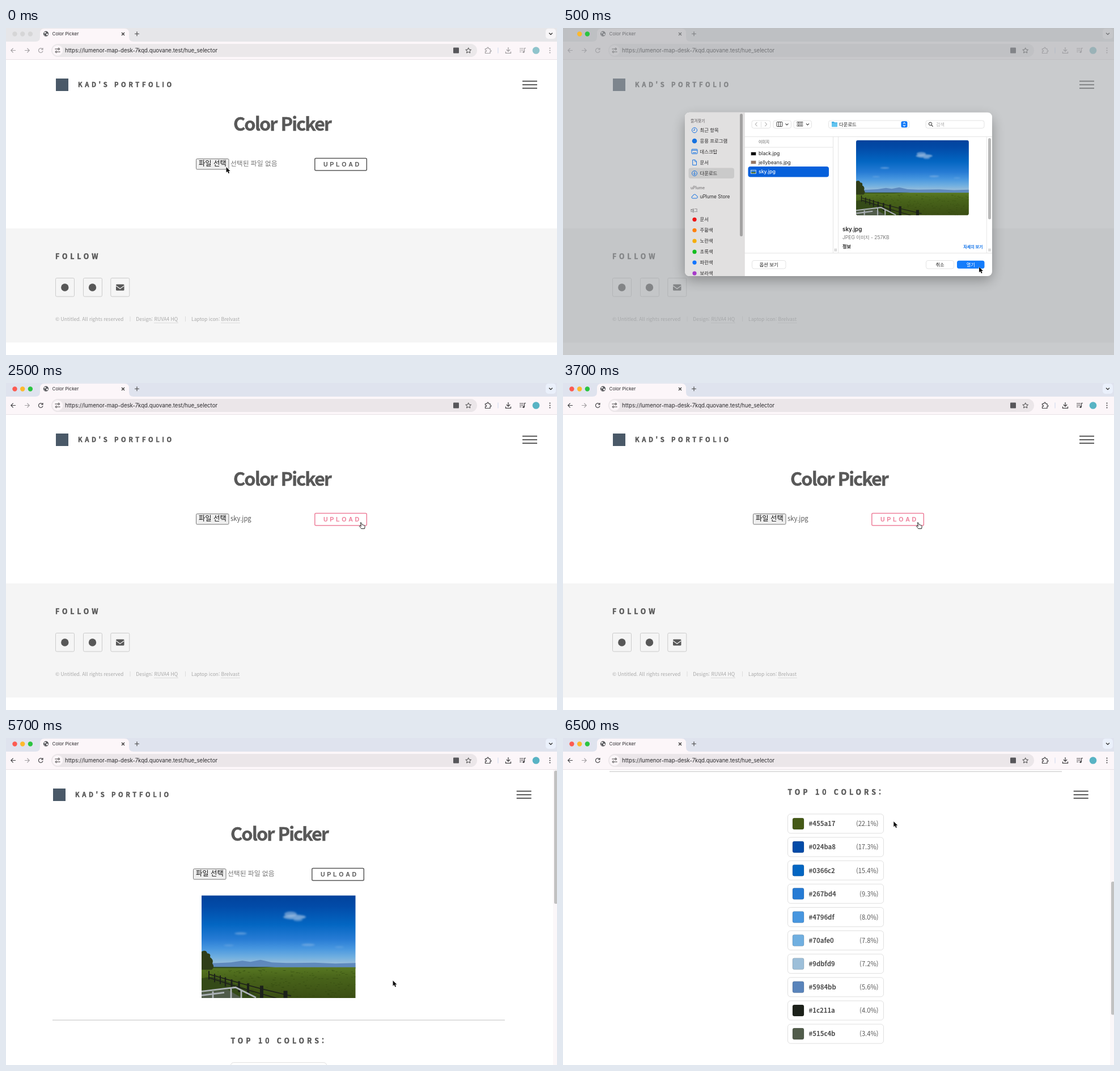
These frames come from a looping animation (972 by 576 pixels, 8000 ms). An HTML page:

```html
<!DOCTYPE html>
<html lang="ko">
<head>
<meta charset="utf-8">
<title>Color Picker</title>
<style>
  html, body { margin: 0; width: 100%; height: 100%; overflow: hidden; background: #fff; }
  svg { display: block; width: 972px; height: 576px; }
  .k { font-family: 'Noto Sans CJK KR', 'Noto Sans CJK', sans-serif; }
  .i { font-family: Inter, 'Noto Sans CJK KR', sans-serif; }
  .a { font-family: 'Liberation Sans', sans-serif; }
  text { white-space: pre; }
</style>
</head>
<body>
<svg id="stage" viewBox="0 0 972 576" xmlns="http://www.w3.org/2000/svg">
  <defs>
    <linearGradient id="sky" x2="0" y2="1">
      <stop offset="0" stop-color="#02429c"/>
      <stop offset=".15" stop-color="#024ba8"/>
      <stop offset=".4" stop-color="#0366c2"/>
      <stop offset=".6" stop-color="#267bd4"/>
      <stop offset=".73" stop-color="#4796df"/>
      <stop offset=".85" stop-color="#70afe0"/>
      <stop offset=".95" stop-color="#9dbfd9"/>
    </linearGradient>
    <linearGradient id="field" x2="0" y2="1">
      <stop offset="0" stop-color="#587822"/>
      <stop offset=".35" stop-color="#48631a"/>
      <stop offset="1" stop-color="#3a4d13"/>
    </linearGradient>
    <filter id="soft" x="-50%" y="-50%" width="200%" height="200%"><feGaussianBlur stdDeviation="1.8"/></filter>
    <filter id="shade" x="-20%" y="-20%" width="140%" height="150%"><feGaussianBlur stdDeviation="11"/></filter>
    <clipPath id="sheet"><rect x="215" y="148.7" width="542" height="288.3" rx="8"/></clipPath>
    <clipPath id="square"><rect width="271.5" height="180.6"/></clipPath>
    <clipPath id="round"><rect width="271.5" height="180.6" rx="5"/></clipPath>
  </defs>
</svg>
<script>
const INK = '#585858', BLUE = '#1672e0';

const rect = (x, y, w, h, fill, more = '') =>
  `<rect x="${x}" y="${y}" width="${w}" height="${h}" fill="${fill}" ${more}/>`;
const disc = (x, y, r, fill, more = '') =>
  `<circle cx="${x}" cy="${y}" r="${r}" fill="${fill}" ${more}/>`;
const line = (d, color, w = 1, more = '') =>
  `<path d="${d}" fill="none" stroke="${color}" stroke-width="${w}" ${more}/>`;
const shape = (d, fill, more = '') => `<path d="${d}" fill="${fill}" ${more}/>`;
const text = (font, x, y, s, size, fill, more = '') =>
  `<text class="${font}" x="${x}" y="${y}" font-size="${size}" fill="${fill}" ${more}>${s}</text>`;
const move = (x, y, inner, scale = 1) => `<g transform="translate(${x} ${y}) scale(${scale})">${inner}</g>`;
const bold = 'font-weight="700"', light = 'font-weight="300"';
const heavy = `font-weight="900" stroke="${INK}" stroke-width=".45"`;
const spaced = n => `${heavy} letter-spacing="${n}"`;

function random(seed) {
  return () => (seed = seed * 16807 % 2147483647) / 2147483647;
}

function grass() {
  const next = random(41);
  let d = '';
  for (let n = 0; n < 220; n++) {
    const y = 131 + 50 * next();
    d += `M${(271 * next()).toFixed(1)} ${y.toFixed(1)}h${(1 + 4 * next()).toFixed(1)}`;
  }
  return line(d, '#2c420c', 1, 'opacity=".45"');
}

function photo() {
  let fence = line('M14 139L70 155L108 165L158 177M14 145L70 163L108 174L132 181', '#20241a', 1.8);
  [[13, 133, 2], [23, 138, 2], [33, 141, 2], [42, 144, 2.4], [53, 148, 3], [66, 151, 3.4], [82, 155, 4], [106, 159, 6], [148, 168, 7]]
    .forEach(([x, y, w]) => fence += rect(x - w / 2, y, w, 9 + w * 3, '#1c211a'));
  return rect(0, 0, 272, 128, 'url(#sky)') +
    `<g filter="url(#soft)" fill="#b9d0ea">
      <ellipse cx="164" cy="38" rx="20" ry="4" opacity=".6"/><ellipse cx="157" cy="33" rx="11" ry="4.5" opacity=".5"/>
      <ellipse cx="170" cy="43" rx="8" ry="2.5" opacity=".4"/>
      <ellipse cx="69" cy="67" rx="11" ry="2" opacity=".4"/><ellipse cx="188" cy="87" rx="12" ry="2" opacity=".35"/>
      <ellipse cx="48" cy="88" rx="9" ry="1.5" opacity=".25"/><ellipse cx="243" cy="91" rx="8" ry="1.5" opacity=".2"/>
    </g>` +
    shape('M0 120L30 119L52 118L72 115L86 117L104 113.5L124 118L150 119L200 118.5L236 120L272 119V129H0Z', '#5984bb', 'opacity=".9"') +
    rect(0, 126.5, 272, 55, 'url(#field)') + grass() +
    shape('M0 126H130L90 128H0Z', '#2f4b20') +
    shape('M0 99Q8 95 10 102Q17 102 15 109Q22 113 19 120Q24 126 18 131H0Z', '#2f3d18') +
    shape('M0 146L20 143L70 160L110 181H0Z', '#344a18') + fence +
    shape('M0 171L46 166L72 181H0Z', '#515c4b') +
    line('M0 169L60 162L96 180M0 176L40 171M20 169V181M52 164V181M70 168V181', '#adb3b8', 2.8);
}
const picture = (x, y, scale, clip) => move(x, y, `<g clip-path="url(#${clip})">${photo()}</g>`, scale);

function chrome(on, lights) {
  const c = on ? '#444346' : '#a29fa2';
  const strip = on ? '#dfe3ee' : '#e6e6e9', bar = '#fcf6f9';
  let s = rect(0, 0, 972, 24, strip) +
    shape('M52 24Q60 24 60 16V9Q60 1 68 1H209Q217 1 217 9V16Q217 24 225 24Z', bar) +
    rect(0, 24, 972, 31, bar) + rect(0, 55, 972, 1, '#e7e1e5');
  lights.forEach((f, n) => s += disc(15.5 + n * 13.7, 10.5, 4.2, f));
  // tab
  s += disc(70.5, 10.2, 4.6, '#55565a') +
    shape('M67 8Q70 6 71 8Q70 10 68 10ZM71 10Q75 9 74 12Q72 14 71 12ZM67 11L69 13L68 13.5Z', '#f2eff1') +
    text('i', 81.5, 13, 'Color Picker', 8.1, '#29282b') +
    line('M204 8L209 13M209 8L204 13', '#333', 1.2) +
    line('M227 10.3H235M231 6.3V14.3', '#444', 1.1) +
    rect(952, 1, 18, 18, on ? '#eaf0fb' : '#f7f5f7', 'rx="5"') +
    line('M958 8.7L961 11.5L964 8.7', '#333', 1.3);
  // toolbar
  s += line('M17 39.5H9M12.6 35.7L8.8 39.5L12.6 43.3', c, 1.2) +
    line('M33 39.5H41M37.4 35.7L41.2 39.5L37.4 43.3', '#a29fa2', 1.2) +
    line('M64.3 37.2A3.8 3.8 0 1 0 65 40.3M65 35V38H61.9', c, 1.2) +
    rect(80, 28, 751, 23, on ? '#ebe6e9' : '#ebe8ea', 'rx="11.5"') + disc(91, 39.5, 9.3, bar) +
    line('M86.5 37H90.5M91.5 42H95.5', '#333', 1.2) +
    disc(93, 37, 1.5, 'none', 'stroke="#333"') + disc(88.7, 42, 1.5, 'none', 'stroke="#333"') +
    text('i', 104, 42.8, 'https://lumenor-map-desk-7kqd.quovane.test/hue_selector', 9.65, '#2b2a2d') +
    rect(789, 34.5, 10, 10, '#57565a', 'rx="1"') +
    shape('M815.7 34.8L817.1 38L820.6 38.3L818 40.6L818.8 44L815.7 42.2L812.6 44L813.4 40.6L810.8 38.3L814.3 38Z', 'none', 'stroke="#444"') +
    line('M845.5 36.5H848.5Q848.5 34 850 34Q851.5 34 851.5 36.5H854V39Q856 39 856 40.3Q856 41.6 854 41.6V44.5H845.5V41.6Q847.7 41.6 847.7 40.3Q847.7 39 845.5 39Z', c, 1.2) +
    rect(867.5, 34.5, 1, 10, '#cbd7ee') +
    line('M886 34V41M882.8 38L886 41.2L889.2 38M881.5 41.5V44.3H890.5V41.5', c, 1.3) +
    line('M906 36H913M906 39H913M906 42H909.5M914.5 42V35.5H917', c, 1.2) + disc(913, 42.3, 1.7, c) +
    disc(935, 39.5, 6.3, on ? '#58b3c4' : '#8fc4cc');
  [35.5, 39.5, 43.5].forEach(y => s += disc(959.5, y, 1.1, c));
  return s;
}

function form(file, hot) {
  const c = hot ? '#ee809b' : INK;
  return rect(88, 89, 22, 22, '#4a5968') +
    text('k', 127, 104.2, "KAD'S PORTFOLIO", 11.2, INK, spaced(4.6)) +
    text('k', 401, 181, 'Color Picker', 32.5, INK, bold + ` letter-spacing="-2" stroke="${INK}" stroke-width=".4"`) +
    rect(335.5, 230.5, 57.5, 18.5, '#efefef', 'rx="1.8" stroke="#777"') +
    text('k', 340, 243.4, '파일 선택', 12.3, '#111', 'font-weight="500"') +
    text('k', 396, 243.4, file || '선택된 파일 없음', file ? 11.2 : 11.8, file ? INK : '#777', light) +
    rect(544.8, 229.6, 91.5, 21.5, 'none', `rx="2" stroke="${c}" stroke-width="1.5"`) +
    text('a', 560, 243.9, 'UPLOAD', 10.6, c, bold + ' letter-spacing="3.7"');
}

function footer() {
  let s = rect(0, 353, 972, 201, '#f5f5f5') + text('k', 87, 406.5, 'FOLLOW', 12.3, INK, spaced(4.9));
  [87.5, 136.5, 184.8].forEach(x => s += rect(x, 440.5, 33, 32.5, 'none', 'rx="2.2" stroke="#cbcbcb"'));
  s += disc(103.8, 457, 6.7, INK) + disc(152.5, 457, 6.7, INK) +
    rect(194, 451.5, 14.5, 11, INK, 'rx="1.5"') + line('M194 454L201.2 459.3L208.5 454', '#f5f5f5', 1.1);
  [[87, '© Untitled. All rights reserved'], [229.3, 'Design:'], [261.5, 'RUVA4 HQ'], [327, 'Laptop icon:'], [379.5, 'Brelvast']]
    .forEach(([x, t]) => s += text('k', x, 516, t, 8.65, '#a9a9a9', light));
  return s + rect(218.5, 508, 1, 9, '#dcdcdc') + rect(316, 508, 1, 9, '#dcdcdc') +
    line('M261.5 519.5H304M379.5 519.5H412.5', '#c4c4c4', 1, 'stroke-dasharray="1 1"');
}

const shades = [['455a17', 22.1], ['024ba8', 17.3], ['0366c2', 15.4], ['267bd4', 9.3], ['4796df', 8],
  ['70afe0', 7.8], ['9dbfd9', 7.2], ['5984bb', 5.6], ['1c211a', 4], ['515c4b', 3.4]];

function results() {
  let s = picture(345, 277.3, 1, 'square') + rect(82, 496.3, 798, 1.2, '#cacaca') +
    text('k', 396.5, 538, 'TOP 10 COLORS:', 12.3, INK, spaced(5));
  shades.forEach(([hex, share], n) => {
    const y = 571.7 + n * 41.13;
    s += rect(396.5, y, 169, 34, '#fff', 'rx="5" stroke="#dfdfdf"') +
      rect(405, y + 7, 20, 20, '#' + hex, 'rx="3" stroke="#000" stroke-opacity=".18" stroke-width=".8"') +
      text('k', 433.5, y + 21.4, '#' + hex, 11.4, '#4c4c4c', bold) +
      text('k', 556.5, y + 21.4, `(${share.toFixed(1)}%)`, 11.2, INK, light + ' text-anchor="end"');
  });
  return s;
}

const menu = x => [92.7, 98.9, 105.1].map(y => rect(x, y, 26, 2, INK)).join('');
const scrollbar = y => rect(965, 56, 7, 520, '#fbf7f9') + rect(967, y, 6, 234.5, '#c1c1c1', 'rx="2.5"');

function dialog() {
  const pill = (x, y, w, h, fill = '#fff') => rect(x, y, w, h, fill, 'rx="3.5" stroke="#dcdcdc" stroke-width=".8"');
  const label = (x, y, s) => text('i', x, y, s, 6.9, '#858385', 'font-weight="600"');
  const item = (y, s) => text('i', 241.5, y, s, 8.4, '#2b2a2b');
  const chevron = x => line(`M${x - 2.5} 168.3l2.5 2.5l2.5 -2.5`, '#444', 1.2);
  const bar = 'rx="2.5"';
  let s = rect(215, 148, 542, 289, '#fff') + rect(215, 148, 104.5, 289, '#e1e0e0') + rect(319.5, 148, 1, 289, '#cfcece') +
    rect(312, 151, 5, 216, '#a3a2a2', bar) + rect(221.5, 246.5, 80.5, 18.5, '#cacaca', 'rx="4"') +
    label(225, 166.2, '즐겨찾기') + label(225, 284, 'uPlume') + label(225, 323.5, '태그');
  ['최근 항목', '응용 프로그램', '데스크탑', '문서', '다운로드'].forEach((t, n) => s += item(183 + n * 18.95, t));
  s += item(299.5, 'uPlume Store') +
    disc(232, 180, 4.5, 'none', `stroke="${BLUE}"`) + line('M232 177V180.3H229.8', BLUE) +
    disc(232, 199, 4.3, BLUE) +
    rect(227, 213.5, 10, 8, 'none', `rx="1" stroke="${BLUE}"`) + line('M227 215.5H237M229 219.5H235', BLUE, 1.2) +
    shape('M228.7 232.3H233L235.5 235V241.5H228.7Z', 'none', `stroke="${BLUE}"`) + line('M232.7 232.5V235.3H235.3', BLUE, .8) +
    disc(232, 256, 4.5, 'none', `stroke="${BLUE}"`) + line('M232 253V258.3M230 256.4L232 258.5L234 256.4', BLUE) +
    shape('M229 300Q226.7 300 226.9 297.8Q227.2 296 229 296Q229.6 292.8 232.6 293Q234.6 293.2 235.2 295.4Q237.5 295.6 237.4 298Q237.2 300 235 300Z', 'none', `stroke="${BLUE}"`);
  [['문서', '#ee1515'], ['주황색', '#ff7f0a'], ['노란색', '#f5ae08'], ['초록색', '#12bd1d'], ['파란색', '#1275ff'], ['보라색', '#a73ac9']]
    .forEach(([t, c], n) => s += disc(232, 337.3 + n * 18.95, 3.6, c) + item(340.3 + n * 18.95, t));
  // top controls
  s += pill(333, 163, 33, 13.5) + line('M349.5 165V175', '#e0e0e0') +
    line('M342.5 166L339.3 169.6L342.5 173.2M356.3 166L359.5 169.6L356.3 173.2', '#b5b5b5', 1.1) +
    pill(371, 163, 31.5, 13.5) + rect(377, 165.5, 10, 8, 'none', 'rx="1" stroke="#444"') +
    line('M380.3 165.5V173.5M383.7 165.5V173.5', '#444') + chevron(395) +
    pill(407, 163, 31.5, 13.5) + chevron(431.5);
  for (let n = 0; n < 6; n++)
    s += rect(413 + n % 3 * 3.6, 165.3 + (n / 3 | 0) * 5, 2.6, 2.8, 'none', 'stroke="#555" stroke-width=".8"');
  s += pill(468.5, 163, 142.5, 13.5) + shape('M474 165H478L479 166.3H484V174H474Z', '#42afe5') + rect(474, 167.6, 10, 6.6, '#62c4ef', 'rx=".8"') +
    text('i', 487, 172.5, '다운로드', 8.4, '#222') +
    rect(596.5, 164.3, 11, 11, '#0b78f8', 'rx="2.5"') + line('M600 168.6L602 166.6L604 168.6M600 171L602 173L604 171', '#fff', 1.1) +
    pill(640, 163, 103, 13.5) + disc(648, 168.8, 2.7, 'none', 'stroke="#333"') + line('M650 171L652.6 173.6', '#333', 1.1) +
    text('i', 658, 172.5, '검색', 8.2, '#b4b4b4');
  // file list
  s += rect(320, 191, 437, .8, '#dedede') + rect(320, 209.7, 156, .8, '#dedede') +
    text('i', 345, 203, '이미지', 6.9, '#555') +
    rect(326.5, 244, 142.5, 18.5, '#0560db', 'rx="4"') +
    text('i', 345, 224.3, 'black.jpg', 8.7, '#222') + text('i', 345, 239.7, 'jellybeans.jpg', 8.7, '#222') +
    text('i', 345, 256, 'sky.jpg', 8.7, '#fff', 'font-weight="500"') +
    rect(331.5, 218.7, 9, 5.6, '#080808', 'stroke="#ddd" stroke-width=".6"') +
    rect(331.5, 233.8, 9, 5.6, '#947564', 'stroke="#ddd" stroke-width=".6"') +
    rect(331.5, 250.3, 9, 6, '#337ec9', 'stroke="#e8eefc" stroke-width=".8"') + rect(332, 254, 8, 2, '#51712a') +
    rect(476, 191, .8, 205, '#dedede') + rect(485.3, 191, .8, 205, '#dedede') + rect(747, 191, .8, 205, '#e2e2e2') +
    rect(750, 194, 5, 143, '#b9b9b9', bar) +
    line('M479.7 388.5V393.5M482 388.5V393.5M751.3 388.5V393.5M753.6 388.5V393.5', '#999', .8) +
    rect(320, 396, 437, .8, '#dedede');
  // preview
  s += picture(517, 197.5, .7325, 'round') +
    text('i', 493, 358.4, 'sky.jpg', 9.8, '#222', 'font-weight="600"') +
    text('i', 493, 372, 'JPEG 이미지 - 257KB', 8.5, '#777') +
    text('i', 493, 388, '정보', 8.2, '#222', bold) +
    text('i', 740.5, 388, '자세히 보기', 7.1, '#0d70e8', bold + ' text-anchor="end"') +
    pill(333.5, 409.5, 59.5, 14.5) + text('i', 363, 419.7, '옵션 보기', 8.4, '#222', 'text-anchor="middle"') +
    pill(640.5, 409.5, 49, 14.5) + text('i', 665, 419.7, '취소', 8.2, '#222', 'text-anchor="middle"') +
    rect(695, 409.7, 48.5, 14, '#147cfb', 'rx="3.5"') + text('i', 719.3, 419.7, '열기', 8.2, '#fff', 'text-anchor="middle"');
  return rect(215, 158, 542, 286, '#000', 'rx="12" opacity=".3" filter="url(#shade)"') +
    `<g clip-path="url(#sheet)">${s}</g>`;
}

const arrow = (x, y) => move(x, y,
  shape('M0 0V10.6L2.5 8.4L4.3 12.4L6.3 11.5L4.5 7.7H7.8Z', '#111', 'stroke="#fff" stroke-width="1" paint-order="stroke"'), .9);
const hand = (x, y) => move(x, y, shape(
  'M-2.8 -6Q-1.6 -7 -.9 -5.5L.3 -2Q1.4 -2.8 2.1 -1.7Q3.4 -2.3 3.8 -1Q5.3 -1 5.2 .6L4.6 4.6H-1.2Q-3 1.8 -4.6 .5Q-4.6 -1 -2.8 -.3L-1.6 .5Z',
  '#fff', 'stroke="#222" stroke-width="1"'));

const LIT = ['#fc5b51', '#fdb92d', '#2bc440'], DIM = Array(3).fill('#d6d6d7');
const paper = rect(0, 0, 972, 576, '#fff');
const start = paper + form() + menu(911) + footer() + chrome(false, DIM);
const veil = rect(0, 0, 972, 576, '#a3a6a9', 'opacity=".58"');
const scrolled = (top, thumb) => paper +
  move(0, -top, move(-5, 0, form()) + results()) + menu(900.7) + scrollbar(thumb) + chrome(true, LIT);

const scenes = [
  [0, start + arrow(388.5, 245)],
  [500, start + veil + rect(9, 4, 14, 13, '#bfc0c3') +
    disc(29.2, 10.5, 4.2, LIT[1]) + disc(42.9, 10.5, 4.2, LIT[2]) + dialog() + arrow(734, 421)],
  [2500, paper + form('sky.jpg', true) + menu(911) + footer() + chrome(true, LIT) + hand(628, 252)],
  [4500, scrolled(0, 57.5) + arrow(682.5, 427.3)],
  [6500, scrolled(437.8, 253) + arrow(583.3, 147)]
];

const stage = document.getElementById('stage');
const layers = scenes.map(([, art]) => {
  const g = document.createElementNS('http://www.w3.org/2000/svg', 'g');
  g.innerHTML = art;
  return stage.appendChild(g);
});

const began = performance.now();
function draw() {
  const t = (performance.now() - began) % 8000;
  const now = scenes.filter(([at]) => at <= t).length - 1;
  layers.forEach((g, n) => g.style.display = n === now ? '' : 'none');
  requestAnimationFrame(draw);
}
draw();
</script>
</body>
</html>
```
